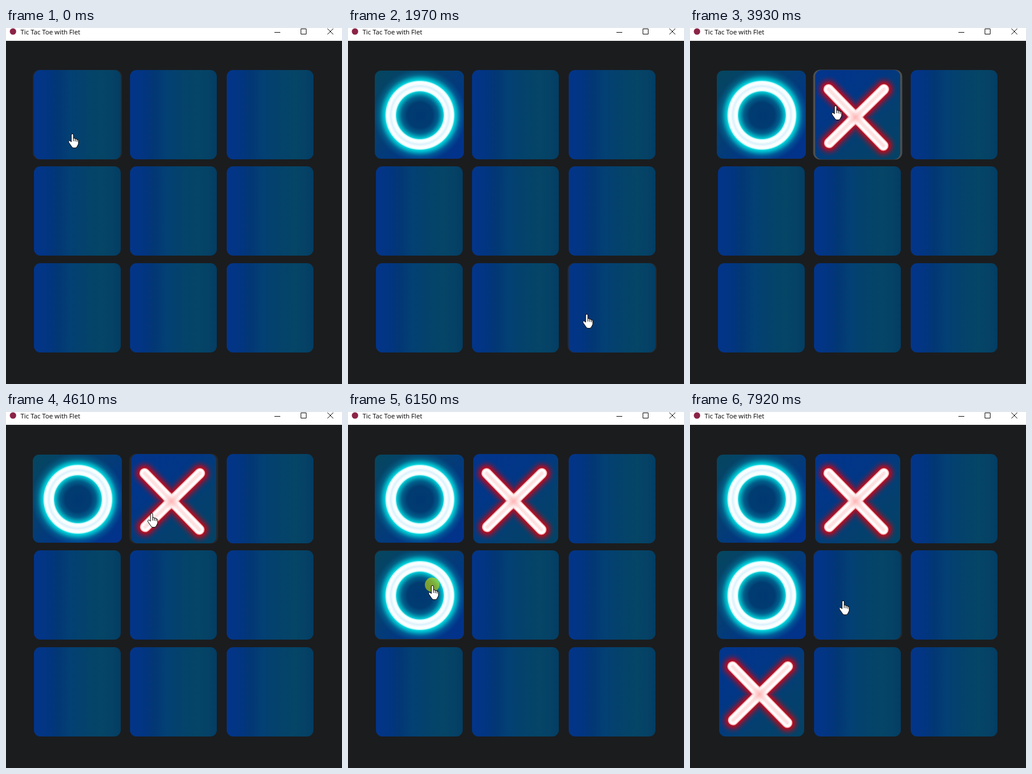
Write an HTML page with a canvas that moves like this. It is 577x610 px and loops after 7990 ms.

```html
<!DOCTYPE html>
<html lang="en">
<head>
<meta charset="utf-8">
<title>Tic Tac Toe with Flet</title>
<style>
  html, body { margin: 0; width: 100%; height: 100%; overflow: hidden; background: #1b1c1e; }
  canvas { position: absolute; left: 0; top: 0; }
  #title {
    position: absolute; left: 25px; top: -1px; color: #000; white-space: nowrap;
    font: 11.2px/16px "Open Sans", "Noto Sans", sans-serif;
  }
</style>
</head>
<body>
<canvas id="stage" width="577" height="610"></canvas>
<div id="title">Tic Tac Toe with Flet</div>
<script>
const ctx = document.getElementById('stage').getContext('2d');
const LOOP = 7990;
const COLS = [46, 211.5, 377], ROWS = [72, 237, 403];
const SIZE = 153;

// Marks placed during the loop: time, column, row, press point
const moves = [
  { t: 270, col: 0, row: 0, mark: 'O', x: 114, y: 181 },
  { t: 3690, col: 1, row: 0, mark: 'X', x: 250, y: 133 },
  { t: 6150, col: 0, row: 1, mark: 'O', x: 145, y: 297 },
  { t: 7000, col: 0, row: 2, mark: 'X', x: 143, y: 461 }
];

// Pointer trips: first step, last step, step count, end point, bend point
const trips = [
  [730, 890, 3, 62, 219, 90, 195],
  [1120, 1270, 3, 86, 358, 66, 300],
  [1670, 1970, 5, 410, 490, 220, 350],
  [2050, 2280, 4, 436, 496, 424, 495],
  [2760, 3290, 8, 250, 133, 145, 200],
  [4000, 4460, 7, 250, 173, 256, 155],
  [4690, 5300, 9, 410, 200, 330, 160],
  [5380, 5920, 8, 145, 297, -80, 330],
  [6230, 6920, 10, 143, 461, 185, 370],
  [7300, 7760, 7, 224, 355, 190, 430],
  [7840, 7920, 2, 263, 323, 248, 335]
];

const clamp = v => Math.max(0, Math.min(1, v));
const ease = p => p * p * (3 - 2 * p);
const bend = (a, c, b, p) => (1 - p) ** 2 * a + 2 * p * (1 - p) * c + p * p * b;

function pointerAt(t) {
  let x = 114, y = 181;
  for (const [t0, t1, n, ex, ey, cx, cy] of trips) {
    if (t < t0) break;
    const gap = (t1 - t0) / (n - 1);
    const step = Math.floor((t - t0 + 5) / gap);
    const p = ease(clamp((step + 1) / n));
    x = bend(x, cx, ex, p);
    y = bend(y, cy, ey, p);
  }
  return { x: Math.round(x), y: Math.round(y) };
}

function box(x, y, w, h, r) {
  ctx.beginPath();
  ctx.roundRect(x, y, w, h, r);
}

function addStops(g, stops) {
  for (const [p, c] of stops) g.addColorStop(p, c);
  return g;
}

function disc(x, y, r, fill) {
  ctx.beginPath();
  ctx.arc(x, y, r, 0, Math.PI * 2);
  ctx.fillStyle = fill;
  ctx.fill();
}

function drawBar() {
  ctx.fillStyle = '#fff';
  ctx.fillRect(0, 0, 577, 22);
  disc(12, 6, 5.5, '#8b2347');
  ctx.strokeStyle = '#111';
  ctx.lineWidth = 1;
  ctx.lineCap = 'butt';
  ctx.beginPath();
  ctx.moveTo(461, 7.5); ctx.lineTo(471, 7.5);
  ctx.rect(506.5, 1.5, 9, 9);
  ctx.moveTo(552, 1); ctx.lineTo(562, 11);
  ctx.moveTo(562, 1); ctx.lineTo(552, 11);
  ctx.stroke();
}

function drawEmpty(col, row) {
  const x = [48, 213, 379][col], y = ROWS[row];
  ctx.fillStyle = addStops(ctx.createLinearGradient(x, 0, x + 149, 0), [
    [0, '#02358a'], [.16, '#023581'], [.27, '#023775'], [.42, '#034074'],
    [.58, '#04426c'], [.78, '#054566'], [.9, '#054266'], [1, '#033d63']
  ]);
  box(x, y, 149, SIZE, 11);
  ctx.fill();
}

function drawO(col, row) {
  const x = COLS[col], y = ROWS[row] + 1, h = 151;
  const cx = x + 77.5, cy = y + 76.5;
  ctx.save();
  box(x, y, SIZE, h, 11);
  ctx.clip();
  ctx.fillStyle = addStops(ctx.createLinearGradient(x, y, x + SIZE, y + h), [
    [0, '#05465f'], [.35, '#044070'], [.7, '#023585'], [1, '#02328c']
  ]);
  ctx.fillRect(x, y, SIZE, h);
  const R = 80;
  const rings = [
    [0, 'rgba(0,56,112,.9)'], [22, 'rgba(0,60,112,.85)'], [31, 'rgba(0,100,142,.85)'],
    [37, 'rgba(0,168,188,.95)'], [40, '#00c8d4'], [42, '#d8ffff'], [44, '#fff'],
    [47, '#f4fcff'], [50, '#daf1fc'], [53, '#f4fcff'], [56, '#fff'], [58, '#d8ffff'],
    [60, '#00d2dc'], [64, 'rgba(0,190,205,.8)'], [70, 'rgba(0,150,180,.36)'],
    [80, 'rgba(0,110,160,0)']
  ];
  ctx.fillStyle = addStops(ctx.createRadialGradient(cx, cy, 0, cx, cy, R),
    rings.map(([r, c]) => [r / R, c]));
  ctx.fillRect(x, y, SIZE, h);
  ctx.restore();
}

function drawX(col, row) {
  const x = [50, 215, 381][col], y = ROWS[row], w = 146;
  ctx.save();
  box(x, y, w, SIZE, 11);
  ctx.clip();
  ctx.fillStyle = addStops(ctx.createLinearGradient(x, y, x + w, y + SIZE), [
    [0, '#02358c'], [.35, '#023686'], [.65, '#043f70'], [1, '#044264']
  ]);
  ctx.fillRect(x, y, w, SIZE);
  const bars = new Path2D();
  bars.moveTo(x + 23, y + 33); bars.lineTo(x + 117, y + 129.5);
  bars.moveTo(x + 118, y + 33); bars.lineTo(x + 24, y + 125);
  ctx.lineCap = 'round';
  const line = (width, color) => {
    ctx.lineWidth = width;
    ctx.strokeStyle = color;
    ctx.stroke(bars);
  };
  for (let i = 0; i < 14; i++) line(46 - i * 2, `rgba(205,8,22,${.025 + .26 * (i / 13) ** 2})`);
  line(18, '#ff8f93');
  line(16, '#ffe4e4');
  line(13.5, '#fff');
  line(8, '#fff0f0');
  line(4.5, '#ffe0e0');
  const cx = x + 69, cy = y + 81;
  disc(cx, cy, 16, addStops(ctx.createRadialGradient(cx, cy, 0, cx, cy, 16), [
    [0, 'rgba(255,175,175,.9)'], [.5, 'rgba(255,200,200,.5)'], [1, 'rgba(255,220,220,0)']
  ]));
  ctx.restore();
}

// Button surface under the image: hover tint and press ripple
function drawButton(col, row, hovered, move, t) {
  const x = COLS[col], y = ROWS[row] - .5;
  const age = move ? t - move.t : -1;
  const rippling = age >= 0 && age < 520;
  if (!hovered && !rippling) return;
  ctx.save();
  box(x, y, SIZE, SIZE + 1, 12);
  ctx.clip();
  if (hovered) {
    ctx.fillStyle = '#27282a';
    ctx.fillRect(x, y, SIZE, SIZE + 1);
  }
  if (rippling) {
    const p = clamp(age / 225);
    const cx = move.x + (x + 76 - move.x) * p, cy = move.y + (y + 77 - move.y) * p;
    const fade = 1 - clamp((age - 220) / 300);
    disc(cx, cy, 30 + 105 * p, `rgba(210,214,218,${.24 * fade})`);
  }
  ctx.restore();
}

const hand = new Path2D(
  'M-1.9 2Q-1.8 .3 0 .3Q1.8 .3 1.9 2V8Q4.6 7 5 9Q7.6 8.2 8 10.2Q10.4 9.6 10.4 12' +
  'V16.5Q10.4 18.5 8.7 21Q7.8 24.3 5 24.5H2Q-.5 24.4-1.4 22L-6 15.4Q-7.4 12.6-5.4 12Q-4 11.7-1.9 14.2Z');
const knuckles = new Path2D('M1.9 8V13M5 9V13.4M8 10.2V14');

function drawPointer({ x, y }) {
  ctx.save();
  ctx.translate(x, y);
  ctx.lineJoin = 'round';
  ctx.lineCap = 'butt';
  ctx.lineWidth = 1;
  ctx.fillStyle = '#fff';
  ctx.strokeStyle = '#000';
  ctx.fill(hand);
  ctx.stroke(hand);
  ctx.stroke(knuckles);
  ctx.restore();
}

function draw(t) {
  ctx.fillStyle = '#1b1c1e';
  ctx.fillRect(0, 0, 577, 610);
  drawBar();
  const tip = pointerAt(t);
  const inside = (v, start) => v >= start && v <= start + SIZE;
  for (let row = 0; row < 3; row++) {
    for (let col = 0; col < 3; col++) {
      const move = moves.find(m => m.col === col && m.row === row);
      drawButton(col, row, inside(tip.x, COLS[col]) && inside(tip.y, ROWS[row]), move, t);
      if (!move || t < move.t) drawEmpty(col, row);
      else if (move.mark === 'O') drawO(col, row);
      else drawX(col, row);
    }
  }
  if (moves.some(m => t >= m.t && t < m.t + 140)) {
    disc(tip.x - .5, tip.y - 1, 12.5, 'rgba(200,220,10,.62)');
  }
  drawPointer(tip);
}

const begin = performance.now();
function tick() {
  draw((performance.now() - begin) % LOOP);
  requestAnimationFrame(tick);
}
tick();
</script>
</body>
</html>
```
